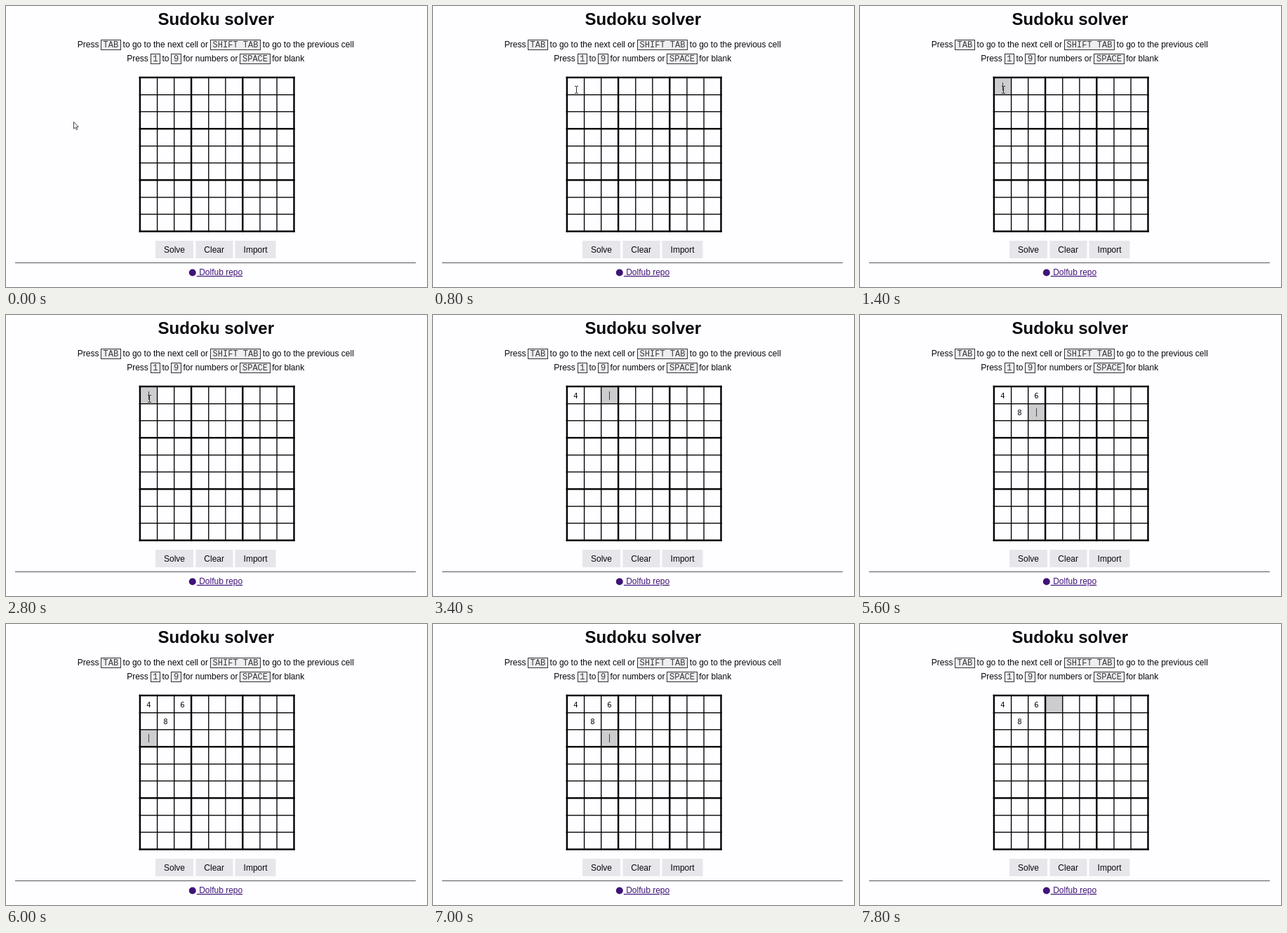
Animation of 600 by 401 pixels, one loop 8 s. Source, as an HTML page:

```html
<!DOCTYPE html>
<html lang="en">
<head>
<meta charset="utf-8">
<title>Sudoku solver</title>
<style>
  html, body { margin: 0; width: 100%; height: 100%; overflow: hidden; background: #fefdff; }
  svg { display: block; width: 600px; height: 401px; }
  text { font: 12px "Liberation Sans", Arial, sans-serif; fill: #08080c; white-space: pre; }
  .title { font-size: 24px; font-weight: bold; text-anchor: middle; }
  .key rect { fill: #efeef1; stroke: #333; stroke-width: 1; }
  .key text { font-family: "Liberation Mono", "Courier New", monospace; fill: #3a3a3e; }
  .button { fill: #e7e6eb; }
  .link { fill: #3f1478; text-decoration: underline; text-anchor: end; }
  .digit { font: 10px "DejaVu Sans", Verdana, sans-serif; text-anchor: middle; }

  .pointer, .beam, .focus, .caret, .digit { animation: 8s step-end -10ms infinite; }
  .pointer { animation-name: pointer; }
  .beam { animation-name: beam; }
  .focus { animation-name: focus; }
  .caret { animation-name: caret; }
  .four { animation-name: four; }
  .six { animation-name: six; }
  .eight { animation-name: eight; }

  @keyframes pointer {
    0% { transform: translate(96px, 165px); opacity: 1; }
    2.5% { transform: translate(112px, 165px); opacity: 1; }
    5% { transform: translate(133px, 164px); opacity: 1; }
    7.5% { transform: translate(191px, 127px); opacity: 1; }
    10%, 100% { opacity: 0; }
  }
  @keyframes beam {
    0% { opacity: 0; }
    10% { opacity: 1; }
    37.5%, 100% { opacity: 0; }
  }
  /* Tab order runs through one 3x3 box before the next */
  @keyframes focus {
    0% { transform: translate(192px, 103px); opacity: 0; }
    17.5% { transform: translate(192px, 103px); opacity: 1; }
    37.5% { transform: translate(216px, 103px); }
    42.5% { transform: translate(240px, 103px); }
    47.5% { transform: translate(192px, 127px); }
    62.5% { transform: translate(216px, 127px); }
    70% { transform: translate(240px, 127px); }
    75% { transform: translate(192px, 151px); }
    85% { transform: translate(216px, 151px); }
    87.5% { transform: translate(240px, 151px); }
    92.5%, 100% { transform: translate(265px, 103px); opacity: 1; }
  }
  @keyframes caret {
    0%, 35%, 62.5%, 70% { opacity: 1; }
    25%, 57.5%, 67.5%, 97.5%, 100% { opacity: 0; }
  }
  @keyframes four { 0% { opacity: 0; } 37.5%, 100% { opacity: 1; } }
  @keyframes six { 0% { opacity: 0; } 47.5%, 100% { opacity: 1; } }
  @keyframes eight { 0% { opacity: 0; } 70%, 100% { opacity: 1; } }
</style>
</head>
<body>
<svg viewBox="0 0 600 401">
  <text class="title" x="299.3" y="27">Sudoku solver</text>

  <text x="101.8" y="59">Press</text>
  <text x="166.6" y="59">to go to the next cell or</text>
  <text x="365.8" y="59">to go to the previous cell</text>
  <text x="172.2" y="79">Press</text>
  <text x="222.4" y="79">to</text>
  <text x="252.4" y="79">for numbers or</text>
  <text x="379.2" y="79">for blank</text>
  <g class="key">
    <rect x="135.5" y="48.5" width="28" height="14"/><text x="138.6" y="59">TAB</text>
    <rect x="291.5" y="48.5" width="71" height="14"/><text x="294.6" y="59">SHIFT TAB</text>
    <rect x="206.5" y="68.5" width="13" height="14"/><text x="209.3" y="79">1</text>
    <rect x="235.5" y="68.5" width="14" height="14"/><text x="238.9" y="79">9</text>
    <rect x="333.5" y="68.5" width="43" height="14"/><text x="337" y="79">SPACE</text>
  </g>

  <g class="focus" opacity="0">
    <rect width="23.5" height="23.5" fill="#cdcccf"/>
    <rect class="caret" x="11" y="6" width="1" height="12" fill="#444"/>
  </g>
  <g id="grid"></g>
  <text class="digit four" x="203.4" y="119">4</text>
  <text class="digit six" x="251.5" y="119">6</text>
  <text class="digit eight" x="227.5" y="143">8</text>

  <rect class="button" x="213" y="335" width="54" height="25"/>
  <rect class="button" x="270.5" y="335" width="53" height="25"/>
  <rect class="button" x="326.5" y="335" width="58" height="25"/>
  <text x="225" y="352">Solve</text>
  <text x="282.3" y="352">Clear</text>
  <text x="338.6" y="352">Import</text>

  <rect x="13" y="366" width="571" height="1" fill="#55545a"/>
  <circle cx="265.8" cy="380.5" r="5" fill="#3f1478"/>
  <text class="link" x="337.2" y="384">&#160;Dolfub repo</text>

  <path class="beam" d="M202 114.5h2l.5 .5 .5-.5h2M204.5 115v9M202 124.5h2l.5-.5 .5 .5h2" fill="none" stroke="#333" stroke-width="1"/>
  <path class="pointer" d="M.5 .5V10.2L2.7 8.2 4.3 11.6 5.8 10.9 4.3 7.6H7.2Z" fill="#fff" stroke="#333" stroke-width=".9"/>
</svg>
<script>
  const grid = document.getElementById('grid');
  const left = 189.7, top0 = 100.8, pitch = 73.2, size = 222;

  function line(x, y, w, h) {
    const r = document.createElementNS('http://www.w3.org/2000/svg', 'rect');
    Object.entries({ x, y, width: w, height: h }).forEach(([k, v]) => r.setAttribute(k, v));
    grid.append(r);
  }

  for (let i = 0; i < 10; i++) {
    const thick = i % 3 === 0;
    const at = Math.floor(i / 3) * pitch + (thick ? 0 : 1.1 + (i % 3) * 24.1);
    const weight = thick ? 2.4 : 1.35;
    line(left + at, top0, weight, size);
    line(left, top0 + at, size, weight);
  }
</script>
</body>
</html>
```
